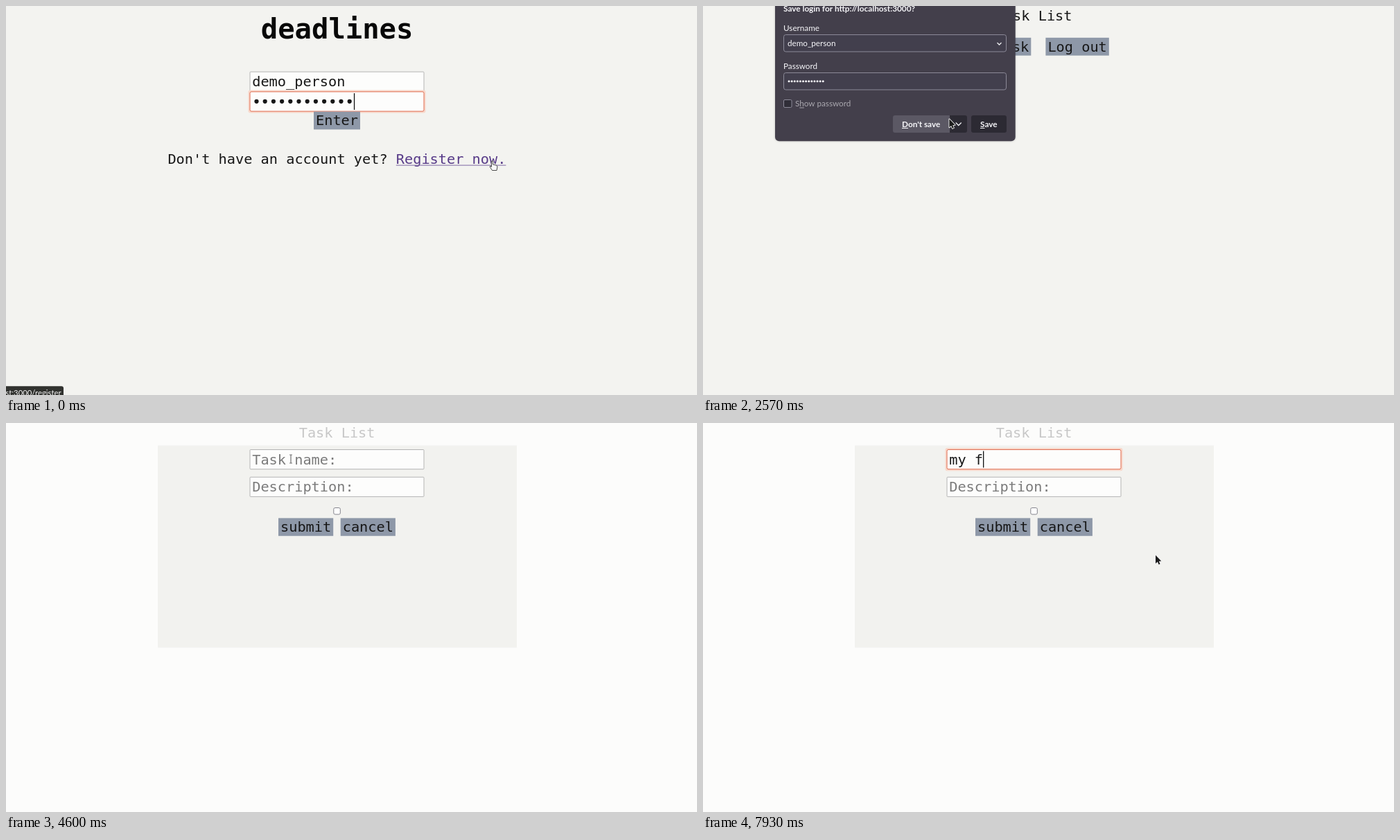
Animation, 997 px wide and 562 px high, one loop 8000 ms. Source, as an HTML page with a canvas:

```html
<!DOCTYPE html>
<html lang="en">
<head>
<meta charset="utf-8">
<title>deadlines</title>
<style>
  html, body { margin: 0; width: 100%; height: 100%; overflow: hidden; background: #f3f3f0; }
  canvas { display: block; width: 100vw; height: 100vh; }
</style>
</head>
<body>
<canvas id="stage" width="997" height="562"></canvas>
<script>
const ctx = document.getElementById('stage').getContext('2d');
const W = 997, H = 562, LOOP = 8000;
const MONO = '20.27px "DejaVu Sans Mono", monospace';
const TITLE = 'bold 40.54px "DejaVu Sans Mono", monospace';
const UI = '11.7px Lato, sans-serif';
const UI_BOLD = 'bold 11.8px Lato, sans-serif';
const CHAR = 12.2;
const USER = 'demo_person';
const PAGE = '#f3f3f0', INK = '#171717', HINT = '#7b7b7b';
const IDLE = '#8e98a8', HOVER = '#5c6370', ACTIVE = '#383f46';

// Event times in ms
const T = {
  lastDot: 70, caretOff: 700, enterHover: 930, statusOff: 1100,
  press: 1480, popupIn: 1600, tasks: 2050, popupOut: 3420,
  addHover: 3760, addPress: 3880, modal: 4490, focus: 5370
};
const TYPED = [7470, 7600, 7740, 7880];

// Pointer keys: time, x, y
const PATH = [
  [0, 702.5, 224], [250, 702.5, 224], [1070, 485.3, 170.5], [1300, 485.3, 170.5],
  [1450, 478, 165], [2000, 478, 165], [2780, 329, 163], [3440, 329, 163],
  [3660, 397, 97], [3860, 411, 52], [4750, 411, 52], [5320, 476, 50],
  [5560, 476, 50], [6370, 653, 191]
];

const clamp = v => Math.max(0, Math.min(1, v));
const ramp = (t, start, length) => clamp((t - start) / length);
const between = (t, a, b) => t >= a && t < b;

function pointerAt(t) {
  const i = PATH.findIndex(k => k[0] > t);
  if (i < 0) return PATH[PATH.length - 1].slice(1);
  const [t0, x0, y0] = PATH[i - 1], [t1, x1, y1] = PATH[i];
  const u = (t - t0) / (t1 - t0), e = u * u * (3 - 2 * u);
  return [x0 + (x1 - x0) * e, y0 + (y1 - y0) * e];
}

function text(str, x, y, font = MONO, color = INK, align = 'left') {
  ctx.font = font;
  ctx.fillStyle = color;
  ctx.textAlign = align;
  ctx.fillText(str, x, y);
}

function rect(x, y, w, h, color) {
  ctx.fillStyle = color;
  ctx.fillRect(x, y, w, h);
}

function round(x, y, w, h, r, fill, stroke) {
  ctx.beginPath();
  ctx.roundRect(x, y, w, h, r);
  if (fill) { ctx.fillStyle = fill; ctx.fill(); }
  if (stroke) { ctx.strokeStyle = stroke; ctx.lineWidth = 1; ctx.stroke(); }
}

function dots(count, x, y, step, r, color) {
  ctx.fillStyle = color;
  for (let i = 0; i < count; i++) {
    ctx.beginPath();
    ctx.arc(x + i * step, y, r, 0, Math.PI * 2);
    ctx.fill();
  }
}

function button(label, x, y, color = IDLE) {
  rect(x - 3, y, label.length * CHAR + 6, 25.8, color);
  text(label, x, y + 19.7);
}

function field(y, focused, border = '#b4b4b4') {
  const h = 28.2;
  if (focused) {
    round(349.5, y - 2.5, 256, h + 5, 3, '#f8d8cb');
    round(352, y, 251, h, 2, '#fdfdfc', '#df6d52');
  } else {
    round(352, y, 251, h, 1, '#fdfdfc', border);
  }
}

function caret(x, y) {
  rect(x, y, 1.3, 24, '#111');
}

function chevron(x, y, s) {
  ctx.beginPath();
  ctx.moveTo(x - s, y - s / 2);
  ctx.lineTo(x, y + s / 2);
  ctx.lineTo(x + s, y - s / 2);
  ctx.strokeStyle = '#eeeef2';
  ctx.lineWidth = 1.3;
  ctx.stroke();
}

function accessKey(label, index, x, y, font, color) {
  text(label, x, y, font, color);
  const start = ctx.measureText(label.slice(0, index)).width;
  rect(x + start, y + 1.5, ctx.measureText(label[index]).width, 1, color);
}

function login(t) {
  const focused = t < T.popupIn;
  text('deadlines', 367.8, 47, TITLE, '#080808');
  field(95.1, false, focused ? '#b4b4b4' : '#a0a0ae');
  field(123.9, focused, '#a0a0ae');
  text(USER, 355.2, 116);
  const count = t < T.lastDot ? 12 : 13;
  dots(count, 361.5, 137.8, CHAR, 3.1, INK);
  if (t < T.caretOff) caret(355.5 + count * CHAR, 126);
  button('Enter', 447, 152.6, t < T.enterHover ? IDLE : t < T.press ? HOVER : ACTIVE);
  text("Don't have an account yet?", 233.4, 228);
  const link = 233.4 + 27 * CHAR;
  text('Register now.', link, 228, MONO, '#573a88');
  rect(link, 229.6, 13 * CHAR, 1, '#7d67a2');
  if (t < T.statusOff) {
    round(-5, 549.3, 88, 20, 3, '#31322f');
    text('localhost:3000/register', 79.5, 562.8, '11.3px Lato, sans-serif', '#f4f4f4', 'right');
  }
}

function tasks(t) {
  text('Task List', 422.7, 20.5);
  button('Add task', 372.7, 45.8, t < T.addHover ? IDLE : t < T.addPress ? HOVER : ACTIVE);
  button('Log out', 497.4, 45.8);
}

function popup(hovered) {
  const white = '#f7f7fa', dark = '#2c2a33', line = '#8c8a98';
  ctx.shadowColor = 'rgba(0,0,0,.25)';
  ctx.shadowBlur = 3;
  round(104, -20, 346.7, 215.3, 6, '#433f4b');
  ctx.shadowBlur = 0;
  ctx.shadowColor = 'transparent';
  text('Save login for http://localhost:3000?', 116, 7.5, UI_BOLD, white);
  text('Username', 116, 36, UI, white);
  round(116.5, 41.5, 321, 24.5, 3, '#423f4d', line);
  text(USER, 122, 58, UI, white);
  chevron(427.5, 54.5, 3);
  text('Password', 116, 91, UI, white);
  round(116.5, 96.5, 321, 24.5, 3, '#423f4d', line);
  dots(13, 124, 108.8, 4.1, 1.5, white);
  round(116.5, 135.5, 11.5, 11, 1.5, '#302e38', line);
  accessKey('Show password', 1, 133, 145, UI, '#aaa8af');
  round(274, 158, 82, 25, [3, 0, 0, 3], hovered ? '#5b5864' : dark);
  round(356, 158, 25, 25, [0, 3, 3, 0], dark);
  rect(355.5, 161, 1, 19, '#4a4754');
  round(387, 158, 51, 25, 3, dark);
  accessKey("Don't save", 0, 287, 174.5, UI_BOLD, white);
  accessKey('Save', 0, 400, 174.5, UI_BOLD, white);
  chevron(368.7, 170.5, 4);
}

function modal(t, alpha) {
  ctx.globalAlpha = alpha * 0.76;
  rect(0, 0, W, H, '#fff');
  ctx.globalAlpha = alpha;
  rect(219, 32.5, 518, 292, '#f2f2ef');
  const focused = t >= T.focus;
  const count = TYPED.filter(k => t >= k).length;
  field(38.5, focused);
  if (count) text('my f'.slice(0, count), 355.2, 59.5);
  else text('Task name:', 355.2, 59.5, MONO, HINT);
  const blink = between(t, 6030, 6640);
  if (focused && !blink) caret(355.2 + count * CHAR, 40.5);
  field(78.2, false);
  text('Description:', 355.2, 99, MONO, HINT);
  round(472.8, 122.5, 9.5, 9.5, 2, '#fff', '#83838b');
  button('submit', 396, 137.4);
  button('cancel', 485.7, 137.4);
  ctx.globalAlpha = 1;
}

function polygon(points) {
  ctx.beginPath();
  points.forEach(([x, y]) => ctx.lineTo(x, y));
  ctx.closePath();
}

function arrow() {
  polygon([[0, 0], [0, 12], [2.8, 9.6], [4.6, 13.6], [6.5, 12.7], [4.8, 8.8], [8.3, 8.5]]);
  ctx.lineJoin = 'round';
  ctx.strokeStyle = '#f4f4f4';
  ctx.lineWidth = 1.8;
  ctx.stroke();
  ctx.fillStyle = '#1b1b1b';
  ctx.fill();
}

function hand() {
  polygon([[-2, 0], [0, 0], [0, 5], [5, 6], [6.5, 8], [5.5, 13.5],
    [-1, 13.5], [-4.5, 8], [-3.5, 7], [-2, 8.5]]);
  ctx.lineJoin = 'round';
  ctx.fillStyle = '#fafafa';
  ctx.fill();
  ctx.strokeStyle = '#4a4a4a';
  ctx.lineWidth = 1;
  ctx.stroke();
}

function beam() {
  rect(-0.5, -6, 1, 12, '#555');
  rect(-2, -6.5, 4, 1, '#777');
  rect(-2, 5.5, 4, 1, '#777');
}

function pointer(t) {
  const [x, y] = pointerAt(t);
  const onLink = t < T.tasks && x > 563 && x < 721 && y > 211;
  const onField = t >= T.modal && x > 351 && x < 603 && (between(y, 38, 68) || between(y, 78, 107));
  ctx.save();
  ctx.translate(x, y);
  (onLink ? hand : onField ? beam : arrow)();
  ctx.restore();
}

function draw(t) {
  rect(0, 0, W, H, PAGE);
  if (t < T.tasks) login(t);
  else tasks(t);
  if (t >= T.modal) modal(t, ramp(t, T.modal, 100));
  const shown = ramp(t, T.popupIn, 100) * (1 - ramp(t, T.popupOut, 70));
  if (shown) {
    ctx.globalAlpha = shown;
    const [x, y] = pointerAt(t);
    popup(between(x, 274, 356) && between(y, 158, 183));
    ctx.globalAlpha = 1;
  }
  pointer(t);
}

const start = performance.now();
function frame() {
  draw((performance.now() - start) % LOOP);
  requestAnimationFrame(frame);
}
frame();
</script>
</body>
</html>
```
